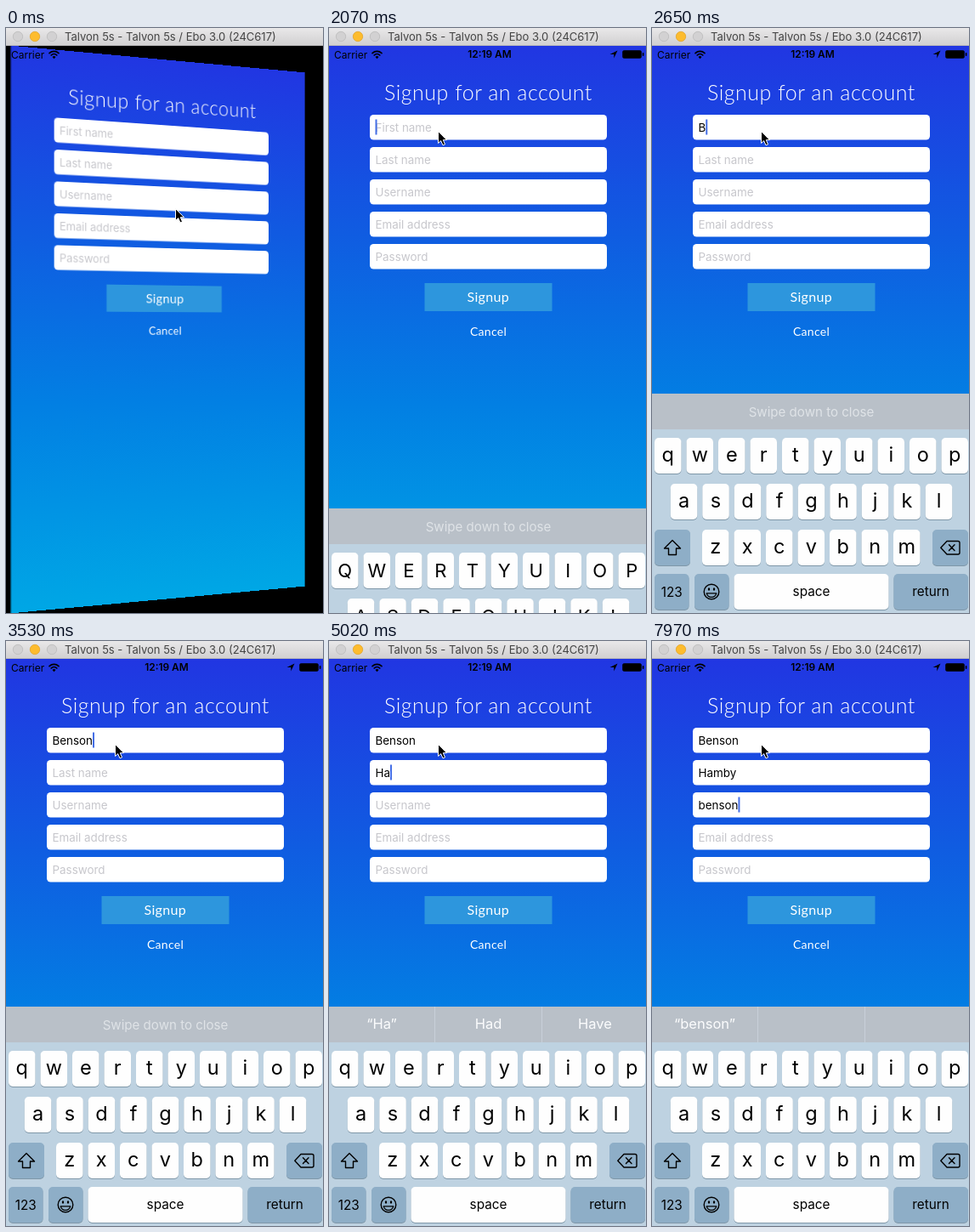
Recreate the animation shown at these times as an HTML page. Size 373x688 px, loop 8000 ms.

```html
<!DOCTYPE html>
<html lang="en">
<head>
<meta charset="utf-8">
<title>Signup form</title>
<style>
  html, body { margin: 0; width: 100%; height: 100%; overflow: hidden; background: #000; }
  #stage { position: absolute; left: 0; top: 0; width: 373px; height: 688px; overflow: hidden; background: #000; }
  #scene { position: absolute; left: 0; top: 21px; width: 373px; height: 667px; perspective: 1136px; }
  svg { position: absolute; left: 0; top: 0; display: block; overflow: visible; }
  text { font-family: Inter, Roboto, "Liberation Sans", sans-serif; white-space: pre; }
  .mid { text-anchor: middle; }
  .head, .btn, .link { font-family: Lato, "Open Sans", sans-serif; font-weight: 300; fill: #fff; text-anchor: middle; }
  .head { font-size: 25px; letter-spacing: .5px; }
  .btn { font-size: 16px; letter-spacing: .35px; font-weight: 400; }
  .link { font-size: 14px; letter-spacing: .3px; font-weight: 400; }
  .field { font-size: 13.4px; }
  .title { font-size: 13px; fill: #444; }
  .status { font-size: 12px; }
  .clock { font-size: 11.9px; font-weight: 600; }
  .upper { font-size: 22px; }
  .lower { font-size: 23.5px; }
  .word { font-size: 15.3px; }
  .hint { font-size: 15.1px; fill: #dfe3e7; }
  .pick { font-size: 16.5px; fill: #fbfcfd; }
</style>
</head>
<body>
<div id="stage">
  <div id="scene"><svg id="form" width="373" height="667" viewBox="0 21 373 667"></svg></div>
  <svg id="over" width="373" height="688" viewBox="0 0 373 688">
    <defs>
      <linearGradient id="chrome" x2="0" y2="1">
        <stop stop-color="#e9e8e9"/><stop offset="1" stop-color="#d0cfd0"/>
      </linearGradient>
    </defs>
    <g id="status"></g>
    <g id="keys"></g>
    <g id="window"></g>
    <path id="mouse" d="M0 0V14L3.2 11.1 5.5 16.4 8 15.3 5.8 10.2H10Z" stroke="#fff" stroke-width="1" stroke-linejoin="round"/>
  </svg>
</div>
<script>
const LOOP = 8000;
const $ = id => document.getElementById(id);

// Step tables: [start ms, value]; each value holds until the next row.
const TILT = [[0, 18.2], [150, 0]];
const MOUSE = [
  [0, [199.5, 212.5]], [150, [190, 198]], [300, [166, 170]], [450, [145, 150]],
  [590, [132, 139]], [740, [128.5, 134.5]], [1040, [128.5, 119]], [1180, [128.5, 105]],
  [1330, [128.5, 99]], [1480, [128.5, 111]], [1620, [128.5, 121.5]]
];
const SLIDE = [[0, 258], [2070, 135], [2210, 18], [2360, 2], [2510, 0]];
const FOCUS = [[0, -1], [2070, 0], [3830, 1], [5750, 2]];
const CAPS = [[0, true], [2510, false], [3830, true], [4870, false]];
const GRAY = [[0, false], [3980, true], [4870, false]];
const PICKS = [
  [0, null], [3980, ["I", "The", "I'm"]],
  [4870, ["“H”", "He", "Had"]], [5020, ["“Ha”", "Had", "Have"]],
  [5170, ["“Ham”", "Hammer", "Hamster"]], [5310, ["“Hamb”", "Hamper", "Hamburger"]],
  [5460, ["“Hamby”", "", ""]], [5750, ["I", "the", "I'm"]],
  [6790, ["“b”", "be", "but"]], [6930, ["“be”", "been", "because"]],
  [7080, ["“ben”", "bend", "bent"]], [7230, ["“bens”", "", ""]],
  [7520, ["“benso”", "", ""]], [7970, ["“benson”", "", ""]]
];
const FIELDS = [
  { hint: "First name", word: "Benson", times: [2510, 2660, 2800, 3090, 3380, 3530] },
  { hint: "Last name", word: "Hamby", times: [4870, 5020, 5170, 5310, 5460] },
  { hint: "Username", word: "benson", times: [6790, 6930, 7080, 7230, 7520, 7670] },
  { hint: "Email address", word: "", times: [] },
  { hint: "Password", word: "", times: [] }
];

const at = (table, t) => table.filter(row => row[0] <= t).pop()[1];
const rect = (x, y, w, h, fill, r = 0) =>
  `<rect x="${x}" y="${y}" width="${w}" height="${h}" rx="${r}" fill="${fill}"/>`;
const label = (x, y, str, cls) => `<text x="${x}" y="${y}" class="${cls}">${str}</text>`;
const line = (d, width) =>
  `<path d="${d}" fill="none" stroke="#000" stroke-width="${width}" stroke-linejoin="round" stroke-linecap="round"/>`;

function buildForm() {
  const fields = FIELDS.map((f, i) =>
    rect(48, 102 + 38 * i, 279, 29.5, "#fff", 4.5) + label(54.5, 122 + 38 * i, f.hint, "field")).join("");
  $("form").innerHTML = `<defs><linearGradient id="sky" x2="0" y2="1">
      <stop stop-color="#2136e2"/><stop offset=".33" stop-color="#105ce1"/>
      <stop offset=".63" stop-color="#027fe3"/><stop offset="1" stop-color="#00a7e5"/>
    </linearGradient></defs>` +
    rect(-3.5, 21, 382, 667, "url(#sky)") +
    label(187.5, 85, "Signup for an account", "head") + fields +
    rect(112.5, 300, 150, 33, "#2d96dd") + label(187.3, 322, "Signup", "btn") +
    label(187.5, 361.5, "Cancel", "link") +
    `<rect id="caret" width="2" height="18" fill="#456fe6"/>`;
}

function buildStatus() {
  $("status").innerHTML = label(6, 35.5, "Carrier", "status") +
    line("M51 29.6a8 8 0 0 1 11 0M53.2 32a4.8 4.8 0 0 1 6.6 0", 1.7) +
    `<path d="M56.5 36.2l-2-2.2a3 3 0 0 1 4 0Z"/>` +
    label(189, 35.3, "12:19 AM", "clock mid") +
    `<path d="M339.5 26.5L335.3 35.5V31H330.5Z"/>` +
    `<rect x="345.5" y="26.5" width="22" height="9" rx="1.8" stroke="#000" stroke-opacity=".6"/>` +
    rect(368.8, 29, 1.6, 4, "#000", .8);
}

function buildWindow() {
  const lights = ["#d2d1d2", "#fdbc2e", "#d2d1d2"].map((c, i) =>
    `<circle cx="${14 + 20 * i}" cy="10" r="5.7" fill="${c}" stroke="${i == 1 ? "#e3a52a" : "#bcbbbc"}" stroke-width=".8"/>`);
  $("window").innerHTML = rect(0, 0, 373, 21, "url(#chrome)") + rect(0, 20, 373, 1, "#b9b8b9") +
    lights.join("") + label(69, 15, "Talvon 5s - Talvon 5s / Ebo 3.0 (24C617)", "title");
}

function drawKeys(caps, gray, picks) {
  const dark = gray ? "#abb1ba" : "#8eaec7";
  const edge = gray ? "#898c91" : "#7f97a8";
  const key = (x, y, w, fill = "#fefefe") => rect(x, y + 1, w, 42, edge, 5) + rect(x, y, w, 42, fill, 5);
  const row = (letters, x0, y) => [...letters].map((c, i) => {
    const x = x0 + 37.5 * i;
    return key(x, y, 31.5) + label(x + 15.75, y + (caps ? 29 : 28), caps ? c : c.toLowerCase(), `${caps ? "upper" : "lower"} mid`);
  }).join("");

  const bar = picks
    ? picks.map((p, i) => label([62, 187.5, 313][i], 455.5, p, "pick mid")).join("") +
      rect(124, 430, 1, 42, "#c8d0d9") + rect(250, 430, 1, 42, "#c8d0d9")
    : label(187.5, 456.5, "Swipe down to close", "hint mid");

  const shift = `<path d="M24 602.5L33.5 612H28.5V619.5H19.5V612H14.5Z" fill="${caps ? "#000" : "none"}" stroke="#000" stroke-width="1.4" stroke-linejoin="round"/>`;
  const erase = line("M347 603.5H360Q362 603.5 362 605.5V617Q362 619 360 619H347L339.8 611.2ZM349.5 607.8L356 614.6M356 607.8L349.5 614.6", 1.4);
  const smile = `<circle cx="70" cy="663" r="8.8" fill="none" stroke="#000" stroke-width="1.4"/>
    <ellipse cx="67" cy="660" rx="1.2" ry="1.7"/><ellipse cx="73" cy="660" rx="1.2" ry="1.7"/>` +
    line("M64.2 664.8H75.8Q74.5 669.3 70 669.3T64.2 664.8Z", 1.2);

  $("keys").innerHTML = rect(0, 430, 373, 42, gray ? "#b8bec7" : "#b9c0c8") +
    rect(0, 472, 373, 216, gray ? "#d1d5da" : "#bed2e1") + bar +
    row("QWERTYUIOP", 3, 482) + row("ASDFGHJKL", 21.8, 536) + row("ZXCVBNM", 59, 590) +
    key(3, 590, 42, caps ? "#fefefe" : dark) + shift +
    key(330, 590, 42, dark) + erase +
    key(3, 642, 40.5, dark) + label(23.2, 668.5, "123", "word mid") +
    key(50, 642, 40.5, dark) + smile +
    key(96.5, 642, 182, "#fefefe") + label(187.5, 668, "space", "word mid") +
    key(284.5, 642, 87.5, dark) + label(328, 668, "return", "word mid");
}

buildForm();
buildStatus();
buildWindow();
const fieldTexts = [...document.querySelectorAll(".field")];
let shown = "";

function drawFields(t) {
  FIELDS.forEach((f, i) => {
    const typed = f.word.slice(0, f.times.filter(ms => ms <= t).length);
    fieldTexts[i].textContent = typed || f.hint;
    fieldTexts[i].setAttribute("fill", typed ? "#000" : "#c7c7cc");
    f.typed = typed;
  });
  const focus = at(FOCUS, t), caret = $("caret");
  caret.style.display = focus < 0 ? "none" : "";
  if (focus < 0) return;
  const width = FIELDS[focus].typed ? fieldTexts[focus].getComputedTextLength() : 0;
  caret.setAttribute("x", 54.5 + width);
  caret.setAttribute("y", 107.5 + 38 * focus);
}

function draw(t) {
  const tilt = at(TILT, t);
  const depth = 186.5 * Math.sin(tilt * Math.PI / 180);
  $("form").style.transform = tilt ? `translateZ(${-depth}px) rotateY(${tilt}deg)` : "none";

  drawFields(t);

  const board = [at(CAPS, t), at(GRAY, t), at(PICKS, t)];
  const look = JSON.stringify(board);
  if (look !== shown) drawKeys(...board);
  shown = look;
  $("keys").setAttribute("transform", `translate(0 ${at(SLIDE, t)})`);

  $("mouse").setAttribute("transform", `translate(${at(MOUSE, t)})`);
}

const start = performance.now();
function tick() {
  draw((performance.now() - start) % LOOP);
  requestAnimationFrame(tick);
}
tick();
</script>
</body>
</html>
```
